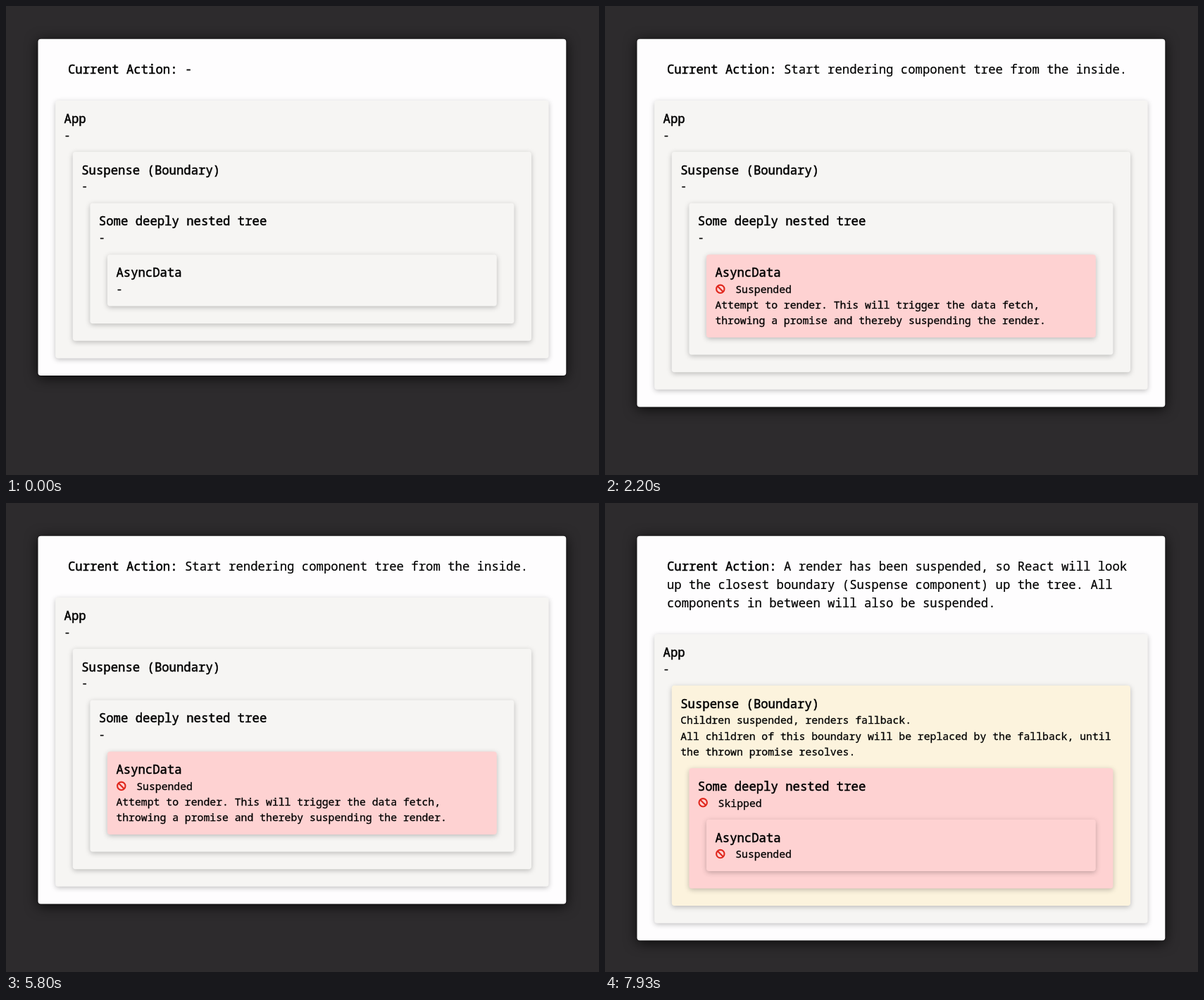
Recreate the animation shown at these times as an HTML page. Size 842x665 px, loop 8 s.

```html
<!DOCTYPE html>
<html lang="en">
<head>
<meta charset="utf-8">
<title>Suspense render steps</title>
<style>
  html, body { margin: 0; width: 100%; height: 100%; overflow: hidden; background: #2d2b2d; }
  svg { display: block; }
  text {
    font: 14.78px "Noto Sans Mono", "DejaVu Sans Mono", monospace;
    fill: #000; stroke: #000; stroke-width: .3px; white-space: pre;
  }
  .big { font-size: 17.29px; stroke-width: .2px; }
  .strong { stroke-width: .5px; }
  .panel { filter: drop-shadow(0 0 1px rgba(0, 0, 0, .6)) drop-shadow(0 3px 9px rgba(0, 0, 0, .75)); }
  .card { filter: drop-shadow(0 2px 3.5px rgba(0, 0, 0, .24)); }
  .stop { fill: none; stroke: #e0261c; stroke-width: 2.1px; }
</style>
</head>
<body>
<svg id="stage" width="842" height="665" viewBox="0 0 842 665"></svg>
<script>
const LOOP = 8000;
const PAD = 24.6;       // inset of each nested card
const ROW = 72.8;       // height of a card's title block
const BIG_LINE = 25.95;
const LINE = 22.2;
const GREY = "#f6f5f3", RED = "#fed2d2", YELLOW = "#fcf3dd";
const TITLES = ["App", "Suspense (Boundary)", "Some deeply nested tree", "AsyncData"];

const idle = { fill: GREY, lines: ["-"] };
const halted = (label, ...more) => ({ fill: RED, stop: true, lines: [label, ...more] });

const scenes = [
  { from: 0, action: ["-"], cards: [idle, idle, idle, idle] },
  {
    from: 1000,
    action: ["Start rendering component tree from the inside."],
    cards: [idle, idle, idle, halted("Suspended",
      "Attempt to render. This will trigger the data fetch,",
      "throwing a promise and thereby suspending the render.")]
  },
  {
    from: 6870,
    action: [
      "A render has been suspended, so React will look",
      "up the closest boundary (Suspense component) up the tree. All",
      "components in between will also be suspended."
    ],
    cards: [
      idle,
      { fill: YELLOW, lines: [
        "Children suspended, renders fallback.",
        "All children of this boundary will be replaced by the fallback, until",
        "the thrown promise resolves."
      ] },
      halted("Skipped"),
      halted("Suspended")
    ]
  }
];

function add(parent, name, attrs, content) {
  const el = document.createElementNS("http://www.w3.org/2000/svg", name);
  for (const key in attrs) el.setAttribute(key, attrs[key]);
  if (content) el.textContent = content;
  return parent.appendChild(el);
}

function box(parent, cls, x, y, right, bottom, fill) {
  add(parent, "rect", { class: cls, x, y, width: right - x, height: bottom - y, rx: 4, fill });
}

function stopSign(parent, x, y) {
  add(parent, "circle", { class: "stop", cx: x, cy: y, r: 5.7 });
  add(parent, "path", { class: "stop", d: `M${x - 4} ${y - 4}l8 8` });
}

function drawCard(parent, card, depth, y, bottom) {
  const x = 70.2 + depth * PAD;
  const textX = x + 12.4;
  box(parent, "card", x, y, 770.6 - depth * PAD, bottom, card.fill);
  add(parent, "text", { class: "big strong", x: textX, y: y + 31.8 }, TITLES[depth]);
  card.lines.forEach((line, i) => {
    const indent = card.stop && i === 0 ? 28.8 : 0;
    add(parent, "text", { x: textX + indent, y: y + 54.6 + i * LINE }, line);
  });
  if (card.stop) stopSign(parent, textX + 7.4, y + 48.9);
}

function drawScene(parent, { action, cards }) {
  const group = add(parent, "g", {});
  const tops = [];
  let y = 134 + (action.length - 1) * BIG_LINE;
  for (const card of cards) {
    tops.push(y);
    y += ROW + (card.lines.length - 1) * LINE;
  }
  const bottom = depth => y + .4 + (3 - depth) * PAD;

  box(group, "panel", 45.5, 46.8, 795.3, bottom(-1), "#fefdfe");
  add(group, "text", { class: "big strong", x: 88, y: 96.4 }, "Current Action:");
  action.forEach((line, i) => {
    add(group, "text", { class: "big", x: i ? 88 : 253.9, y: 96.4 + i * BIG_LINE }, line);
  });
  cards.forEach((card, depth) => drawCard(group, card, depth, tops[depth], bottom(depth)));
  return group;
}

const stage = document.getElementById("stage");
const groups = scenes.map(scene => drawScene(stage, scene));

function update(time) {
  const t = time % LOOP;
  const current = scenes.filter(scene => t >= scene.from).length - 1;
  groups.forEach((group, i) => {
    group.style.display = i === current ? "" : "none";
  });
}

function tick() {
  update(performance.now());
  requestAnimationFrame(tick);
}
tick();
</script>
</body>
</html>
```
